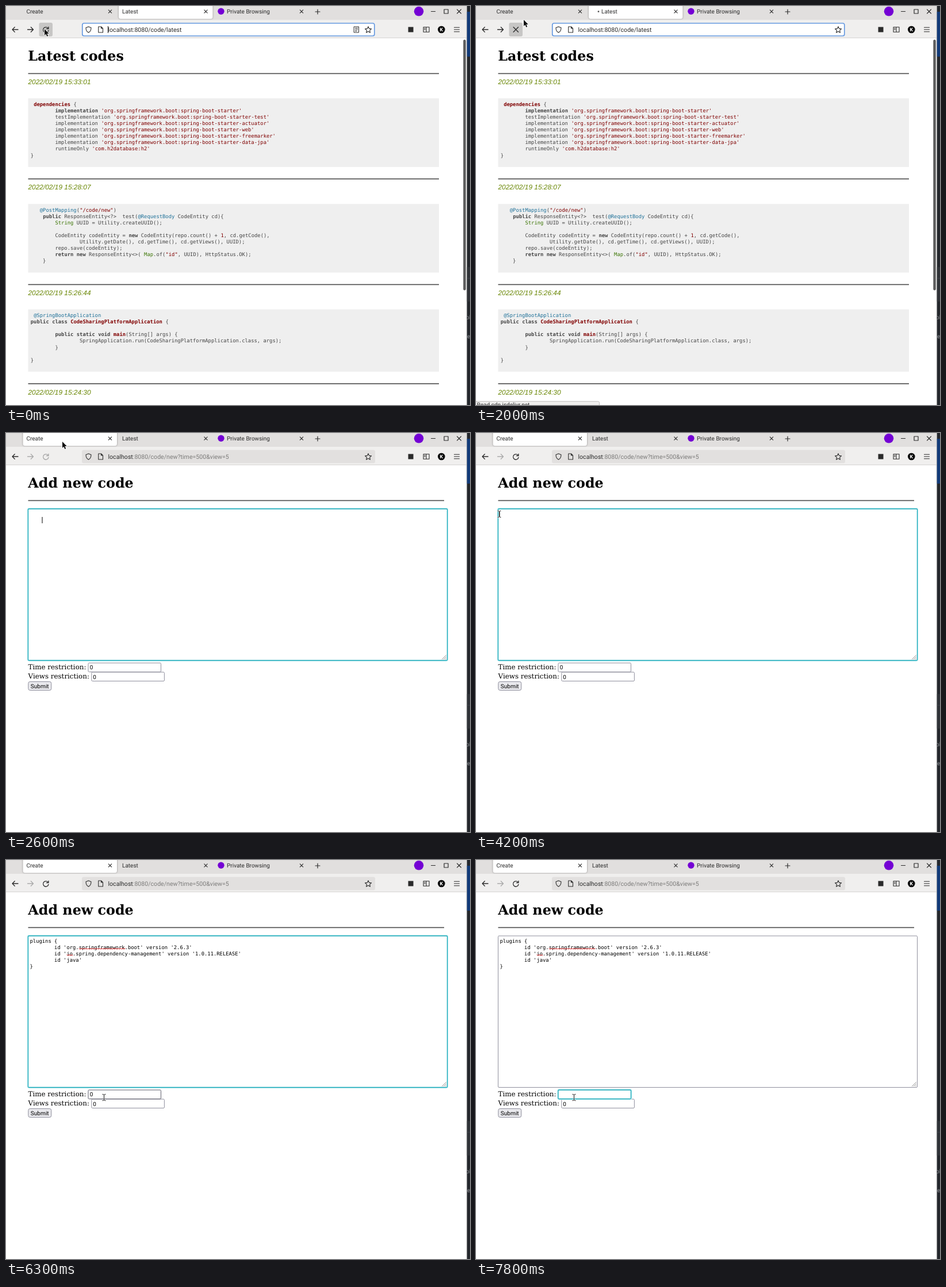
These frames come from a looping animation (807 px wide and 694 px high, 8000 ms). An HTML page with a canvas:

```html
<!DOCTYPE html>
<html lang="en">
<head>
<meta charset="utf-8">
<title>Code sharing demo</title>
<style>
html, body { margin: 0; width: 100%; height: 100%; overflow: hidden; background: #fff; }
canvas { display: block; }
</style>
</head>
<body>
<canvas id="stage" width="807" height="694"></canvas>
<script>
const ctx = document.getElementById('stage').getContext('2d');
ctx.textRendering = 'geometricPrecision';

const LOOP = 8000, STEP = 100;
const UI = 'Roboto, "Open Sans", sans-serif';
const SERIF = '"DejaVu Serif", serif';
const MONO = '8.86px "DejaVu Sans Mono", monospace';
const COL = 5.333, LINE = 11.07;
const INK = '#2b2b2b', PURPLE = '#7400d4';

// A caret splits styled runs; the first letter of a run names its style.
const styles = {
  k: ['bold ', '#444'], t: ['bold ', '#800000'], s: ['', '#800000'],
  b: ['', '#397300'], m: ['', '#1f7199']
};
const dep = (word, name) => `        ${word} ^s'${name}'^`;
const boot = 'org.springframework.boot:spring-boot-starter';

const posts = [
  { rule: 117.5, date: '2022/02/19 15:33:01', top: 160.5, bottom: 280, code: [
    ' ^tdependencies^ {',
    dep('^kimplementation^', boot),
    dep('testImplementation', boot + '-test'),
    dep('implementation', boot + '-actuator'),
    dep('implementation', boot + '-web'),
    dep('implementation', boot + '-freemarker'),
    dep('implementation', boot + '-data-jpa'),
    dep('runtimeOnly', 'com.h2database:h2'),
    '}'] },
  { rule: 300.7, date: '2022/02/19 15:28:07', top: 344.3, bottom: 463.7, code: [
    '   ^m@PostMapping^(^s"/code/new"^)',
    '    ^kpublic^ ResponseEntity<?>  test(^m@RequestBody^ CodeEntity cd){',
    '        ^bString^ UUID = Utility.createUUID();',
    '',
    '        CodeEntity codeEntity = ^knew^ CodeEntity(repo.count() + ^s1^, cd.getCode(),',
    '                Utility.getDate(), cd.getTime(), cd.getViews(), UUID);',
    '        repo.save(codeEntity);',
    '        ^kreturn^ ^knew^ ResponseEntity<>( ^bMap^.of(^s"id"^, UUID), HttpStatus.OK);',
    '    }'] },
  { rule: 484.5, date: '2022/02/19 15:26:44', top: 527.7, bottom: 636, code: [
    ' ^m@SpringBootApplication^',
    '^kpublic^ ^kclass^ ^tCodeSharingPlatformApplication^ {',
    '',
    '        ^kpublic^ ^kstatic^ ^kvoid^ ^tmain^(String[] args) {',
    '                SpringApplication.run(CodeSharingPlatformApplication.class, args);',
    '        }',
    '',
    '}'] },
  { rule: 657, date: '2022/02/19 15:24:30' }
];

const snippet = [
  'plugins {',
  "        id 'org.springframework.boot' version '2.6.3'",
  "        id 'io.spring.dependency-management' version '1.0.11.RELEASE'",
  "        id 'java'",
  '}'
];

// Pointer stops: time, x, y
const pointer = [
  [0, 67, 40], [400, 87, 41], [900, 79, 42], [1000, 67, 40],
  [1900, 75, 33], [2000, 83, 24], [2100, 87, 20], [2300, 91, 18], [2400, 95, 16], [2500, 98, 15],
  [3400, 92, 40], [3500, 70, 90], [3600, 48, 135], [3700, 40, 141],
  [5500, 44, 190], [5600, 60, 290], [5700, 76, 370],
  [5900, 112, 405], [6000, 155, 417], [6200, 163, 415], [6300, 170, 413]
];

function box(x, y, w, h, fill) {
  ctx.fillStyle = fill;
  ctx.fillRect(x, y, w, h);
}
function round(x, y, w, h, r, fill, stroke, width = 1) {
  ctx.beginPath();
  ctx.roundRect(x, y, w, h, r);
  if (fill) { ctx.fillStyle = fill; ctx.fill(); }
  if (stroke) { ctx.strokeStyle = stroke; ctx.lineWidth = width; ctx.stroke(); }
}
function disc(x, y, r, fill) {
  ctx.beginPath();
  ctx.arc(x, y, r, 0, 7);
  ctx.fillStyle = fill;
  ctx.fill();
}
function path(d, x, y, stroke, width = 1.2, fill) {
  const p = new Path2D(d);
  ctx.save();
  ctx.translate(x, y);
  ctx.lineCap = ctx.lineJoin = 'round';
  if (fill) { ctx.fillStyle = fill; ctx.fill(p); }
  if (stroke) { ctx.strokeStyle = stroke; ctx.lineWidth = width; ctx.stroke(p); }
  ctx.restore();
}
function text(s, x, y, font, fill) {
  ctx.font = font;
  ctx.fillStyle = fill;
  ctx.fillText(s, x, y);
}
const label = (s, x, y, size = 10, fill = INK) => text(s, x, y, `${size}px ${UI}`, fill);
const cross = (x, y, r, width = 1.1) =>
  path(`M${-r} ${-r}L${r} ${r}M${r} ${-r}L${-r} ${r}`, x, y, INK, width);

function codeLine(line, x, y) {
  let col = 0;
  line.split('^').forEach((run, i) => {
    const [weight, color] = i % 2 ? styles[run[0]] : ['', '#444'];
    const s = i % 2 ? run.slice(1) : run;
    text(s, x + col * COL, y, weight + MONO, color);
    col += s.length;
  });
}

function drawTabs(t, create) {
  box(0, 0, 802, 24, '#e1dfde');
  if (!create && t >= 2300) round(29.5, -6, 163.5, 29, 4, '#d0cecd');
  ctx.save();
  ctx.shadowColor = 'rgba(0,0,0,.4)';
  ctx.shadowBlur = 3;
  round(create ? 29.5 : 196, -6, 163.5, 28.5, 4, '#fff');
  ctx.restore();

  const loading = t >= 1500 && t < 2300;
  label('Create', 35.5, 12.7);
  label('Latest', loading ? 218 : 202, 12.7);
  if (loading) disc(208 + 5 * Math.cos((t - 2000) / 800 * 2 * Math.PI), 9.7, 1.4, '#555');
  disc(374, 9.3, 5.7, PURPLE);
  label('Private Browsing', 384, 12.7);
  for (const x of [181, 347.5, 514]) cross(x, 9.5, 2.7);
  path('M-4 0H4M0 -4V4', 542, 10, INK, 1.2);

  disc(718, 9.3, 8.3, PURPLE);
  path('M-3.5 0H3.5', 743, 9.5, INK);
  path('M-3.5 -3.5H3.5V3.5H-3.5Z', 765.5, 9.5, INK);
  cross(788, 9.5, 3.5);
}

function drawToolbar(t, create) {
  box(0, 24, 802, 31.5, '#f0efee');
  box(0, 55, 802, 1, '#d6d4d2');

  const arrow = 'M5 0H-5M-.8 -4.2L-5 0L-.8 4.2';
  path(arrow, 16, 41, INK, 1.3);
  path('M-5 0H5M.8 -4.2L5 0L.8 4.2', 42.5, 41, create ? '#aaa' : INK, 1.3);

  const hover = t < 400 || (t >= 1000 && t < 2300);
  if (hover) round(57.5, 29, 23.5, 24, 3, t === 1200 ? '#b2b1b0' : '#c7c6c5');
  if (t >= 1500 && t < 2300) cross(69.3, 41, 4.2, 1.3);
  else path('M3.6 -2.8A4.7 4.7 0 1 0 4.6 1.2M4.6 -5V-1.6H1.1', 69.3, 41.3,
    t >= 2300 && t < 3500 ? '#a5a5a5' : INK, 1.3);

  if (create) round(132, 29.5, 510, 23, 3, '#e2e0df');
  else round(132.8, 30, 508, 22, 3, '#fff', '#679ae0', 1.7);
  path('M0 -5L4.5 -3.3C4.5 1 3 3.8 0 5.3C-3 3.8 -4.5 1 -4.5 -3.3Z', 143.5, 41, INK, 1.1);
  path('M-3.7 -5H1L4 -2V5H-3.7ZM1 -5V-2H4', 164.5, 41, INK, 1.1);

  if (create) {
    label('localhost', 177.5, 44.7, 10.6);
    label(':8080/code/new?time=500&view=5', 177.5 + ctx.measureText('localhost').width, 44.7, 10.6, '#7d7c7b');
  } else {
    label('localhost:8080/code/latest', 177.5, 44.7, 10.6);
    if (t < 1300 || t >= 2300) box(177, 35, 1, 12, '#111');
  }
  if (!create && (t < 1500 || t >= 2300)) {
    path('M-4 -5H4V5H-4ZM-2 -2.5H2M-2 0H2M-2 2.5H.5', 609.5, 41, INK, 1);
  }
  path('M0 -5.5L1.6 -1.8L5.5 -1.4L2.6 1.2L3.4 5L0 3L-3.4 5L-2.6 1.2L-5.5 -1.4L-1.6 -1.8Z', 630, 41.2, INK, 1.1);

  box(699.5, 36.5, 9, 9, INK);
  path('M-5 -4.2H5V4.2H-5ZM0 -4.2V4.2M-3.4 -2H-1.7M-3.4 0H-1.7', 731, 41, INK, 1.1);
  disc(757.3, 41, 6.3, '#0b0b0b');
  text('K', 754.4, 44, `bold 8.5px ${UI}`, '#fff');
  path('M-4.5 -3.7H4.5M-4.5 0H4.5M-4.5 3.7H4.5', 784, 41, INK, 1.1);
}

function drawLatest(t) {
  text('Latest codes', 38.3, 95, `bold 23.8px ${SERIF}`, '#000');
  for (const { rule, date, top, bottom, code } of posts) {
    box(38.5, rule - 0.8, 714.5, 1.6, '#4a4a4a');
    text(date, 38.5, rule + 18.7, 'italic 11.9px "Liberation Sans", sans-serif', '#678500');
    if (!code) continue;
    box(38.5, top, 714.5, bottom - top, '#efefef');
    code.forEach((line, i) => codeLine(line, 42.8, top + 13.5 + i * LINE));
  }
  round(795.3, 58.5, 4.4, 436, 2.2, '#5b5b5b');
  if (t >= 1700 && t < 2300) {
    round(-2, 687.8, 216.5, 12, 2, '#f0efee', '#bdbbb9');
    label('Read cdn.jsdelivr.net', 1.5, 697);
  }
}

function field(x, y, w, h, focused, border = '#8f8f9d') {
  if (focused) {
    round(x - 1.8, y - 1.8, w + 3.6, h + 3.6, 3, '#e4f8fa');
    round(x - .6, y - .6, w + 1.2, h + 1.2, 2, null, '#a9e5ec', 1.5);
  }
  round(x, y, w, h, 1.5, '#fff', focused ? '#1ba9b8' : border, focused ? 1.3 : 1);
}

function squiggle(x, end, y) {
  let d = `M${x} ${y}`;
  for (let i = 1; x + i * 2 <= end; i++) d += `L${x + i * 2} ${y + (i % 2 ? 1.6 : 0)}`;
  path(d, 0, 0, '#f01818', .9);
}

function drawForm(t) {
  const typing = t < 6600, pasted = t >= 4800;
  text('Add new code', 38.3, 95, `bold 23.8px ${SERIF}`, '#000');
  box(38.5, 116.7, 723.5, 1.6, '#4a4a4a');

  field(38.5, 132, 729, 263.5, typing);
  path('M0 7L7 0M3 7L7 3M6 7L7 6', 758.5, 386.5, '#777', .8);
  if (pasted) snippet.forEach((line, i) => text(line, 41.5, 143.7 + i * LINE, MONO, '#000'));
  if (t >= 4900) {
    squiggle(127, 208, 153.6);
    squiggle(106, 117, 164.7);
  }
  if (t < 3500) box(62.5, 146, 1, 11, '#000');
  if (t >= 4200 && t < 4800) box(41, 136, 1, 10, '#000');
  if (pasted && t < 5900) box(47, 179, 1, 11, '#000');

  text('Time restriction:', 38.5, 410.7, `11.9px ${SERIF}`, '#000');
  text('Views restriction:', 38.5, 427, `11.9px ${SERIF}`, '#000');
  field(148.9, 416, 126.5, 15.5);
  field(143, 400, 126.5, 15.5, !typing, t >= 6000 ? '#5f5f6c' : '#8f8f9d');
  if (t < 7400) label('0', 145.7, 411.3, 10, '#000');
  label('0', 151.3, 427.5, 10, '#000');
  if (!typing && t < 7400) box(152, 402, 1, 12, '#000');
  if (t >= 7400 && t < 7800) box(146, 402, 1, 12, '#000');

  round(38.8, 432.5, 40, 15, 3, '#e9e9ed', '#8f8f9d');
  label('Submit', 42.8, 443.5, 10.1, '#000');
}

// Sliver of the window behind
function drawBackdrop() {
  box(801.5, 0, 6, 694, '#24272c');
  box(801.5, 10, 6, 78, '#123a78');
  box(801.5, 454, 6, 60, '#2f3237');
  box(801.5, 473, 6, 1, '#3c4046');
  label('ol', 800, 545, 10, '#8d9095');
  label('er', 802, 578, 10, '#8d9095');
  box(800.5, 0, 1, 694, '#d0d0d0');
}

function drawPointer(t) {
  const [, x, y] = pointer.filter(p => p[0] <= t).pop();
  if (t >= 3600) {
    const beam = 'M-2.5 -5.5Q0 -5.5 0 -4.5Q0 -5.5 2.5 -5.5M0 -4.5V4.5M-2.5 5.5Q0 5.5 0 4.5Q0 5.5 2.5 5.5';
    path(beam, x + .5, y, '#fff', 2);
    path(beam, x + .5, y, '#111', 1);
  } else {
    path('M0 0V11L2.5 8.8L4.3 12.9L6.2 12L4.4 8.1H7.8Z', x, y, '#fff', 1.6);
    path('M0 0V11L2.5 8.8L4.3 12.9L6.2 12L4.4 8.1H7.8Z', x, y, null, 0, '#111');
  }
}

function render(now) {
  const t = Math.floor(now % LOOP / STEP) * STEP;
  const create = t >= 2600;
  box(0, 0, 807, 694, '#fff');
  create ? drawForm(t) : drawLatest(t);
  drawTabs(t, create);
  drawToolbar(t, create);
  drawBackdrop();
  drawPointer(t);
}

const start = performance.now();
function tick() {
  render(performance.now() - start);
  requestAnimationFrame(tick);
}
tick();
</script>
</body>
</html>
```
